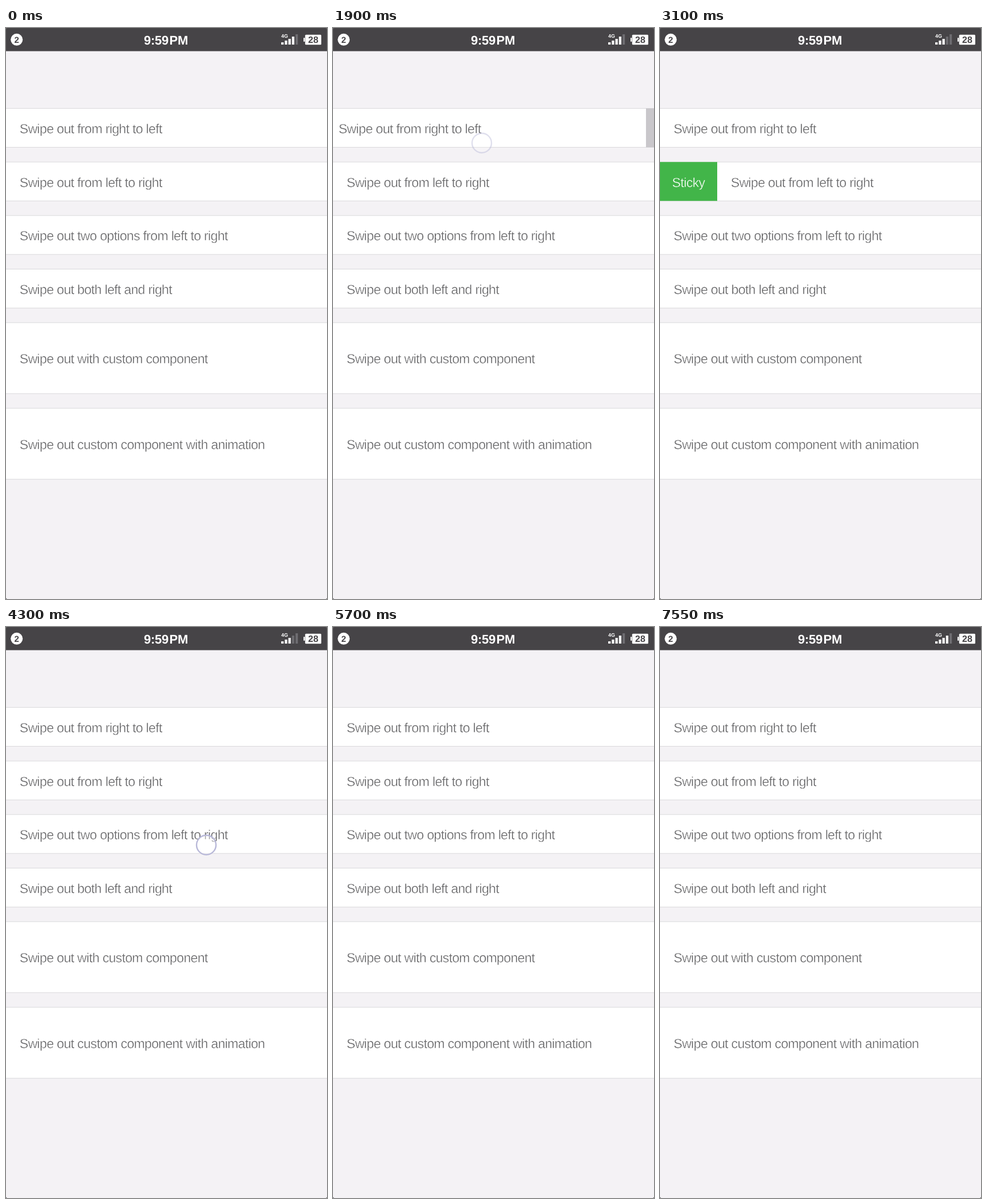
An HTML page for the animation above (8000 ms loop, 561 px wide and 998 px high).

```html
<!DOCTYPE html>
<html lang="en">
<head>
<meta charset="utf-8">
<title>Swipe rows</title>
<style>
  html, body { margin: 0; width: 100%; height: 100%; overflow: hidden; background: #2b2a2d; }
  svg { display: block; width: 100vw; height: 100vh; }
  text { font-family: "Liberation Sans", Arial, sans-serif; text-rendering: geometricPrecision; }
  .label { font-size: 23px; letter-spacing: -.65px; stroke-width: .45px; }
  .bar text { font-weight: bold; }
</style>
</head>
<body>
<svg viewBox="0 0 561 998" xmlns="http://www.w3.org/2000/svg">
  <rect width="561" height="998" rx="2.5" fill="#f4f2f5"/>
  <g class="bar">
    <path d="M0 40.5V2.5A2.5 2.5 0 0 1 2.5 0H558.5A2.5 2.5 0 0 1 561 2.5V40.5Z" fill="#464447"/>
    <circle cx="18.7" cy="20.3" r="10.5" fill="#fff"/>
    <text x="18.7" y="25.8" font-size="15" text-anchor="middle" fill="#464447">2</text>
    <g fill="#fff">
      <text x="241" y="28.6" font-size="22" letter-spacing="-.3">9:59</text>
      <text x="285.6" y="28.6" font-size="22" letter-spacing="-.3">PM</text>
      <text x="481" y="17" font-size="8.8">4G</text>
      <rect x="522.8" y="11.8" width="28.2" height="17.4" rx="1.5"/>
      <rect x="520" y="17" width="2.3" height="7" rx="1"/>
    </g>
    <text x="537" y="26.2" font-size="16" text-anchor="middle" fill="#464447">28</text>
    <g id="signal"></g>
  </g>
  <g id="rows"></g>
  <circle id="touch" r="17" fill="#fff" fill-opacity=".4" stroke="#b8b8d8" stroke-width="2.4"/>
</svg>
<script>
const LOOP = 8000, STEP = 50, WIDTH = 561, BUTTON = 100;
const GREEN = '#42b549', RED = '#ff0000', GREY = '#c9c7cb';
const $ = id => document.getElementById(id);

function add(parent, tag, attrs, content = '') {
  const el = document.createElementNS('http://www.w3.org/2000/svg', tag);
  for (const key in attrs) el.setAttribute(key, attrs[key]);
  el.textContent = content;
  return parent.appendChild(el);
}

function addButton(parent, x, y, h, name, color) {
  add(parent, 'rect', { x, y, width: BUTTON, height: h, fill: color });
  add(parent, 'text', {
    class: 'label', x: x + BUTTON / 2 - .3, y: y + h / 2 + 9.4,
    'text-anchor': 'middle', fill: '#fff', stroke: color
  }, name);
}

const rowSpecs = [
  { y: 140.5, h: 68, text: 'Swipe out from right to left', right: [['Cancel', GREY]] },
  { y: 234.2, h: 68, text: 'Swipe out from left to right', left: ['Sticky', GREEN] },
  { y: 327.8, h: 68, text: 'Swipe out two options from left to right',
    right: [['Delete', RED], ['Cancel', GREY]] },
  { y: 421.4, h: 68, text: 'Swipe out both left and right', left: ['Sticky', GREEN] },
  { y: 515, h: 124, text: 'Swipe out with custom component' },
  { y: 664.7, h: 124, text: 'Swipe out custom component with animation' }
];

const sliders = rowSpecs.map(({ y, h, text, left, right = [] }) => {
  const row = $('rows');
  add(row, 'rect', { x: -2, y, width: WIDTH + 4, height: h, fill: '#fff', stroke: '#dad9dc' });
  const slider = add(row, 'g', {});
  add(slider, 'text', {
    class: 'label', x: 23.7, y: y + h / 2 + 9.4, fill: '#626264', stroke: '#fff'
  }, text);
  if (left) addButton(slider, -BUTTON, y, h, ...left);
  right.forEach((b, i) => addButton(slider, WIDTH + i * BUTTON, y, h, ...b));
  return slider;
});

const bars = [4, 7, 10, 14, 18].map((height, i) =>
  add($('signal'), 'rect', { x: 481 + i * 6.25, y: 29 - height, width: 4.2, height }));

// The finger lands at start; the row follows after a short lag and settles at end.
const swipes = [
  { row: 0, start: 750, end: 1250, lag: 75, from: 0, to: -100, x: [330, 235], y: 195.5 },
  { row: 0, start: 1650, end: 2100, lag: 65, from: -100, to: 0, x: [172, 260], y: 201 },
  { row: 1, start: 2550, end: 3050, lag: 75, from: 0, to: 100, x: [200, 295], y: 271 },
  { row: 1, start: 3450, end: 3850, lag: 65, from: 100, to: 0, x: [384, 295], y: 271 },
  { row: 2, start: 4300, end: 4850, lag: 170, from: 0, to: -200, x: [350, 190], y: 381 },
  { row: 2, start: 5050, end: 5600, lag: 100, from: -200, to: 0, x: [180, 340], y: 378 },
  { row: 3, start: 6250, end: 6800, lag: 75, from: 0, to: 100, x: [200, 295], y: 457 },
  { row: 3, start: 7150, end: 7550, lag: 65, from: 100, to: 0, x: [330, 240], y: 457 }
];

const clamp = v => Math.min(1, Math.max(0, v));
const easeOut = u => 1 - (1 - u) ** 3;
const mix = (a, b, u) => a + (b - a) * u;

function draw(t) {
  const offsets = sliders.map(() => 0);
  const touch = $('touch');
  let alpha = 0;
  for (const s of swipes) {
    if (t < s.start) continue;
    const begin = s.start + s.lag;
    offsets[s.row] = mix(s.from, s.to, easeOut(clamp((t - begin) / (s.end - begin))));
    const held = t - s.start;
    alpha = 1 - clamp((held - 150) / 180);
    touch.setAttribute('cx', mix(...s.x, easeOut(clamp(held / 240))));
    touch.setAttribute('cy', s.y);
  }
  touch.setAttribute('opacity', alpha);
  sliders.forEach((g, i) => g.setAttribute('transform', `translate(${offsets[i]} 0)`));
  const strength = t >= 3050 && t < 5700 ? 3 : 4;
  bars.forEach((bar, i) => bar.setAttribute('fill', i < strength ? '#fff' : '#6d6c70'));
}

const origin = performance.now();
function tick() {
  const t = (performance.now() - origin) % LOOP;
  draw(Math.floor(t / STEP) * STEP);
  requestAnimationFrame(tick);
}
draw(0);
tick();
</script>
</body>
</html>
```
